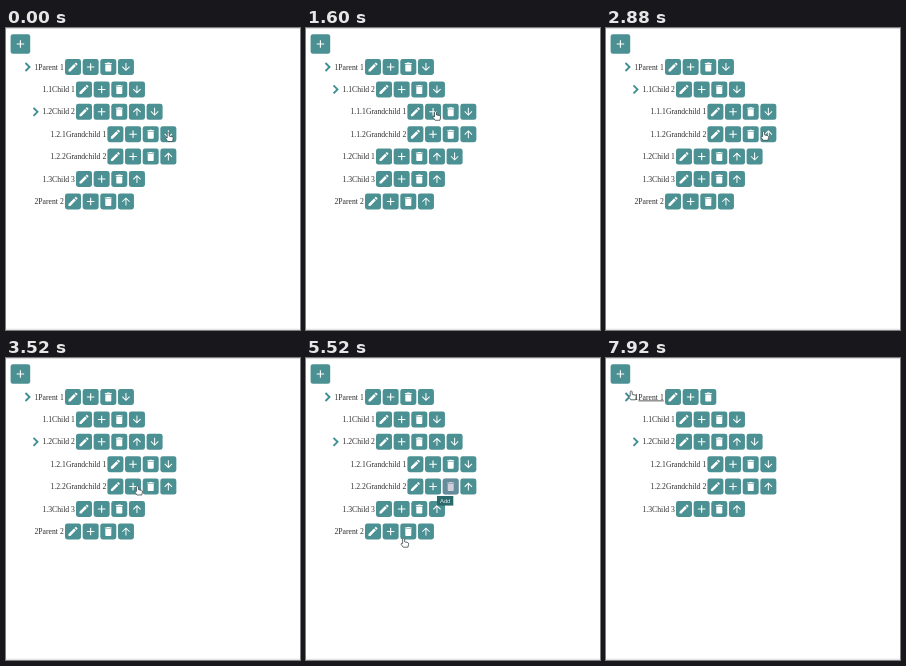
An HTML page for the animation above (8 s loop, 294 px wide and 302 px high).

```html
<!DOCTYPE html>
<html lang="en">
<head>
<meta charset="utf-8">
<title>Tree editor</title>
<style>
  html, body { margin: 0; width: 100%; height: 100%; overflow: hidden; background: #fff; }
  svg { display: block; width: 294px; height: 302px; }
  .label { font: 7.7px "Liberation Serif", "Times New Roman", serif; fill: #2e2e2e; }
  .label .hover { text-decoration: underline; }
  .tip { font: 5.8px "Liberation Sans", Arial, sans-serif; fill: #e4f0f0; }
</style>
</head>
<body>
<svg id="stage" viewBox="0 0 294 302">
  <path d="M0 .5H294M0 301.3H294" stroke="#dcdcdc"/>
  <g id="trees"></g>
  <g id="tooltip">
    <rect x="131" y="138" width="16.3" height="9.6" fill="#2b6a6c"/>
    <text class="tip" x="139.2" y="145" text-anchor="middle">Add</text>
  </g>
  <g id="cursor">
    <path id="hand" d="M-1 .8Q0-.6 1 .8V3.6L4.3 4.4Q5.2 4.8 5 6L4.4 9H-.4L-2.6 6Q-2.6 4.6-1 5.4Z"
      fill="#fff" stroke="#3c4a4c" stroke-width=".8" stroke-linejoin="round"/>
    <path id="arrow" d="M0 0V7L1.5 5.7 2.6 8.3 3.8 7.8 2.7 5.2H4.7Z"
      fill="#2d4a4c" stroke="#fff" stroke-width=".5"/>
  </g>
</svg>
<script>
const LOOP = 8000, STEP = 80;
const TEAL = '#4b9092';
const ICONS = {
  edit: 'M3 17.25V21h3.75L17.81 9.94l-3.75-3.75zM20.71 7.04a1 1 0 0 0 0-1.41l-2.34-2.34a1 1 0 0 0-1.41 0l-1.83 1.83 3.75 3.75z',
  add: 'M19.5 13h-6.4v6.5h-2.2V13H4.5v-2h6.4V4.5h2.2V11h6.4z',
  remove: 'M6 19c0 1.1.9 2 2 2h8c1.1 0 2-.9 2-2V7H6zM19 4h-3.5l-1-1h-5l-1 1H5v2h14z',
  up: 'M4 12l1.41 1.41L11 7.83V20h2V7.83l5.58 5.59L20 12l-8-8z',
  down: 'M20 12l-1.41-1.41L13 16.17V4h-2v12.17l-5.58-5.59L4 12l8 8z'
};
const ROW = { top: 39, pitch: 22.4 };
const BUTTON = { size: 16, pitch: 17.65, start: [67, 78, 109.4] };

const $ = id => document.getElementById(id);
const node = (name, ...kids) => ({ name, kids });
const child1 = node('Child 1'), child3 = node('Child 3');
const child2 = node('Child 2', node('Grandchild 1'), node('Grandchild 2'));
const parent2 = node('Parent 2');
const lower = node('Parent 1', child1, child2, child3);
const raised = node('Parent 1', child2, child1, child3);

// Each tree is shown from its time until the next one.
const scenes = [
  { at: 0, tree: [lower, parent2] },
  { at: 1120, tree: [raised, parent2] },
  { at: 3440, tree: [lower, parent2] },
  { at: 6160, tree: [lower] }
];

function flatten(list, prefix = '', level = 0) {
  return list.flatMap((item, i) => {
    const number = prefix + (i + 1);
    const actions = ['edit', 'add', 'remove'];
    if (i > 0) actions.push('up');
    if (i < list.length - 1) actions.push('down');
    return [{ ...item, number, level, actions }, ...flatten(item.kids, number + '.', level + 1)];
  });
}

function button(icon, x, y, size = BUTTON.size) {
  const h = size / 2;
  return `<rect x="${x - h}" y="${y - h}" width="${size}" height="${size}" rx="2.4" fill="${TEAL}"/>
    <path d="${ICONS[icon]}" fill="#fff" transform="translate(${x - 6} ${y - 6}) scale(.5)"/>`;
}

function buildScene(scene) {
  const g = document.createElementNS('http://www.w3.org/2000/svg', 'g');
  let html = button('add', 14.4, 16, 19.6);
  scene.targets = [{ x0: 4.6, x1: 24.2, y0: 6, y1: 26 }];
  flatten(scene.tree).forEach((row, i) => {
    const x = 28.5 + 8 * row.level, y = ROW.top + ROW.pitch * i;
    const first = BUTTON.start[row.level], h = BUTTON.size / 2;
    if (row.kids.length)
      html += `<path d="M${x - 9} ${y - 4}l4 4-4 4" fill="none" stroke="#3f9094" stroke-width="1.9"/>`;
    html += `<text class="label" x="${x}" y="${y + 2.5}">${row.number}<tspan>${row.name}</tspan></text>`;
    scene.targets.push({ x0: x - 4, x1: first - h - 1, y0: y - 7, y1: y + 5, label: i });
    row.actions.forEach((icon, k) => {
      const bx = first + k * BUTTON.pitch;
      html += button(icon, bx, y);
      scene.targets.push({ x0: bx - h, x1: bx + h, y0: y - h, y1: y + h });
      if (icon === 'remove' && row.name === 'Grandchild 2')
        html += `<rect class="tint" x="${bx - h}" y="${y - h}" width="16" height="16" rx="2.4" fill="#8c86a8" opacity="0"/>`;
    });
  });
  g.innerHTML = html;
  $('trees').append(g);
  scene.group = g;
  scene.labels = [...g.querySelectorAll('tspan')];
  scene.tint = g.querySelector('.tint');
}

// Pointer tip: time, x, y
const path = [
  [0, 162.2, 104.5], [720, 129.5, 83.3], [1600, 129.5, 83.3],
  [2880, 157.6, 103.3], [3280, 131.4, 128], [4880, 131.4, 128],
  [5440, 97.6, 180.2], [5680, 97.6, 180.2], [6080, 101, 171],
  [7280, 101, 171], [7920, 25.2, 32.8], [LOOP, 25.2, 32.8]
];

const ramp = (t, a, b) => Math.min(1, Math.max(0, (t - a) / (b - a)));
const ease = p => p * p * (3 - 2 * p);

function pointer(t) {
  const i = path.findIndex(k => k[0] > t);
  const [t0, x0, y0] = path[i - 1], [t1, x1, y1] = path[i];
  const p = ease(ramp(t, t0, t1));
  return [x0 + (x1 - x0) * p, y0 + (y1 - y0) * p];
}

const show = (el, on) => el.setAttribute('visibility', on ? 'visible' : 'hidden');

function draw(t) {
  const scene = scenes.findLast(s => t >= s.at);
  scenes.forEach(s => show(s.group, s === scene));

  const [x, y] = pointer(t);
  const hit = scene.targets.find(b => x >= b.x0 && x <= b.x1 && y >= b.y0 && y <= b.y1);
  $('cursor').setAttribute('transform', `translate(${x} ${y})`);
  show($('hand'), hit);
  show($('arrow'), !hit);
  scene.labels.forEach((el, i) => el.classList.toggle('hover', !!hit && hit.label === i));

  const held = t < 5760;
  $('tooltip').setAttribute('opacity', held ? ramp(t, 4320, 4720) : 0);
  const tint = t >= 3680 && held ? .15 * ramp(t, 3600, 3840) + .25 * ramp(t, 4320, 4720) : 0;
  scene.tint.setAttribute('opacity', tint);
}

scenes.forEach(buildScene);
const begin = performance.now();
function tick() {
  const t = (performance.now() - begin) % LOOP;
  draw(Math.floor(t / STEP) * STEP);
  requestAnimationFrame(tick);
}
tick();
</script>
</body>
</html>
```
